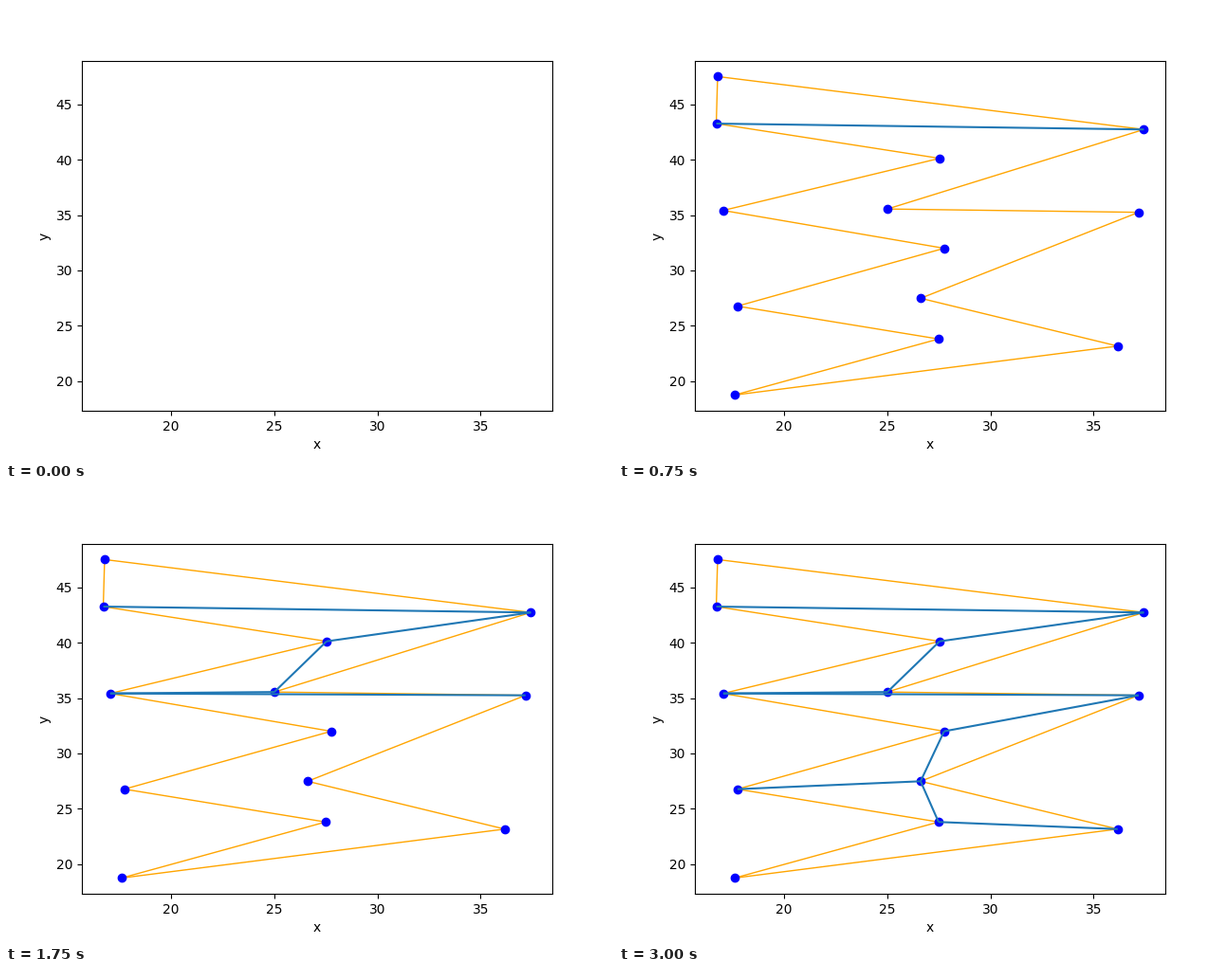
Write a matplotlib script that moves like this. It is 640 px wide and 480 px high and loops after 3.25 s.

```python
import matplotlib.pyplot as plt
from matplotlib.animation import FuncAnimation
from matplotlib.collections import LineCollection

INTERVAL = 250

# A y-monotone polygon: both chains run from top to bottom
LEFT = [(16.79, 47.525), (16.725, 43.27), (27.54, 40.13), (17.06, 35.42),
        (27.76, 32.00), (17.75, 26.77), (27.49, 23.80), (17.61, 18.735)]
RIGHT = [(37.435, 42.74), (25.01, 35.55), (37.175, 35.25),
         (26.62, 27.48), (36.165, 23.16)]


def turn(a, b, c):
    """Cross product of ab and ac; positive for a left turn."""
    return (b[0] - a[0]) * (c[1] - a[1]) - (b[1] - a[1]) * (c[0] - a[0])


def triangulate(left, right):
    """Sweep downwards and return the diagonals in the order found."""
    order = sorted(left + right, key=lambda p: -p[1])
    stack, found = order[:2], []
    for p in order[2:-1]:
        top = stack[-1]
        on_left = p in left
        if (top in left) != on_left:
            found += [(q, p) for q in reversed(stack[1:])]
            stack = [top, p]
            continue
        last = stack.pop()
        while stack and (turn(stack[-1], last, p) > 0) == on_left:
            last = stack.pop()
            found.append((last, p))
        stack += [last, p]
    return found + [(q, order[-1]) for q in reversed(stack[1:-1])]


ring = LEFT + RIGHT[::-1]
diagonals = triangulate(LEFT, RIGHT)

fig, ax = plt.subplots(figsize=(6.4, 4.8), dpi=100)
ax.set_xlabel("x")
ax.set_ylabel("y")

outline = LineCollection(list(zip(ring, ring[1:] + ring[:1])),
                         colors="orange", linewidths=1)
ax.add_collection(outline, autolim=False)
points, = ax.plot(*zip(*ring), "bo")
cuts = LineCollection([], colors="C0", linewidths=1.5)
ax.add_collection(cuts, autolim=False)


def update(i):
    """Show the outline, then the points, then one more diagonal per step."""
    outline.set_visible(i >= 1)
    points.set_visible(i >= 2)
    cuts.set_segments(diagonals[:max(0, i - 2)])
    return outline, points, cuts


def init():
    return update(0)


anim = FuncAnimation(fig, update, frames=len(diagonals) + 3, init_func=init,
                     interval=INTERVAL, repeat=True, repeat_delay=0)
plt.show()
```
